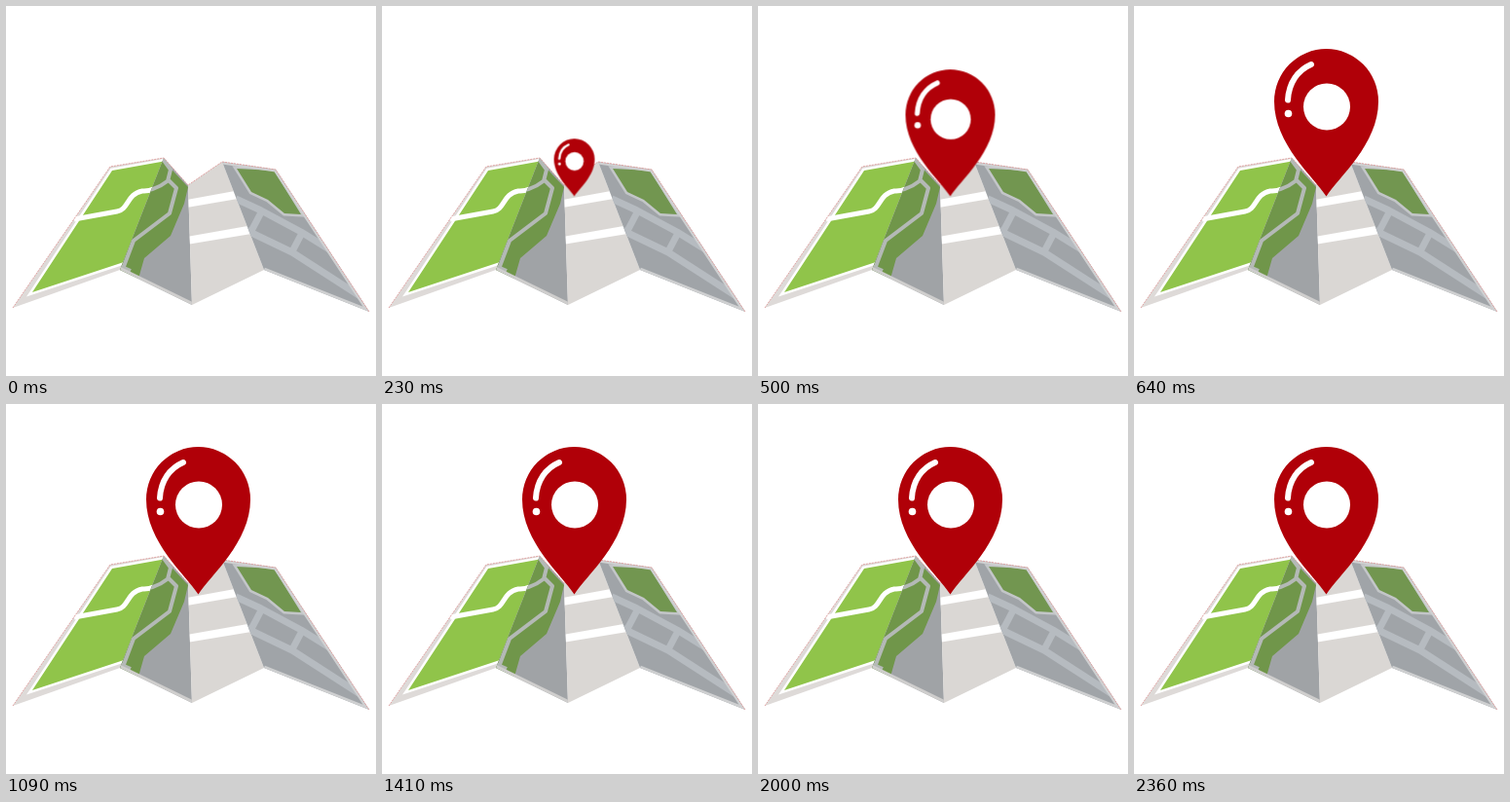
Animation of 380x380 px, one loop 2.4 s. Source, as an HTML page:

```html
<!DOCTYPE html>
<html lang="en">
<head>
<meta charset="utf-8">
<title>Map pin</title>
<style>
html, body { margin: 0; width: 100%; height: 100%; overflow: hidden; background: #fff; }
svg { display: block; width: 100vw; height: 100vh; }
.line { fill: none; stroke-linejoin: round; }
.park { paint-order: stroke; stroke-width: 5; }
.pin {
  transform-origin: 197.5px 195.5px;
  animation: grow 2400ms -1ms infinite;
}
@keyframes grow {
  0% { transform: scale(0); animation-timing-function: steps(12); }
  22.5% { transform: scale(.938); animation-timing-function: step-end; }
  24.375%, 100% { transform: scale(1); }
}
</style>
</head>
<body>
<svg viewBox="0 0 380 380">
  <defs>
    <clipPath id="p1"><path d="M7 310 107 165 162 156 117 271z"/></clipPath>
    <clipPath id="p2"><path d="M162 156 187 184 191 307 117 271z"/></clipPath>
    <clipPath id="p3"><path d="M187 184 222 160 265 271 191 307z"/></clipPath>
    <clipPath id="p4"><path d="M222 160 277 168 373 314 265 271z"/></clipPath>
  </defs>

  <g clip-path="url(#p1)">
    <path fill="#dedad8" d="M0 150h170v170H0z"/>
    <path class="park" fill="#90c44a" stroke="#fff" d="M27 294 109 169 170 158 170 247 118 264z"/>
    <path class="line" stroke="#fff" stroke-width="5" d="M70 219 114 211C126 209 124 193 140 190Q152 191 166 179"/>
  </g>

  <g clip-path="url(#p2)">
    <path fill="#a0a3a6" d="M110 150h90v160h-90z"/>
    <path fill="#70964a" d="M160 157 187 186 183 203 169 236 142 259 136 280 112 270z"/>
    <path class="line" stroke="#b4b9b6" stroke-width="4" d="M132 191Q152 191 167 179L175 187 168 213 131 241 120 270M161 157 169 168 166 180M112 265 128 272"/>
    <path class="line" stroke="#cfcecd" stroke-width="6" d="M117 271 191 307"/>
  </g>

  <g clip-path="url(#p3)">
    <path fill="#dad7d4" d="M180 150h90v160h-90z"/>
    <path fill="#fff" d="M186 199 235 190 238 198 186 207zM186 237 248 226 252 234 186 245z"/>
  </g>

  <g clip-path="url(#p4)">
    <path fill="#a0a4a8" d="M215 150h160v170H215z"/>
    <path class="line" stroke="#b6bbc0" stroke-width="7" d="M236 198 262 210 303 232 345 258M246 230 294 253 370 302M263 210 251 233M304 233 293 254"/>
    <path class="park" fill="#729650" stroke="#c3c6c8" d="M237 167 275 169 303 214 286 213 269 199 252 191z"/>
    <path class="line" stroke="#cfd0d1" stroke-width="5" d="M222 160 277 168 373 314 265 271"/>
  </g>

  <path class="line" stroke="#e0a3a3" stroke-width="1" stroke-dasharray="2 1" d="M7 310 107 165 162 156 187 184 222 160 277 168 373 314"/>

  <g class="pin">
    <path fill="#b00008" d="M197.5 195.500C185 176 144 142 144 98A53.5 54 0 0 1 251 98C251 142 210 176 197.5 195.500z"/>
    <circle fill="#fff" cx="198" cy="103.500" r="24"/>
    <path class="line" stroke="#fff" stroke-width="6" stroke-linecap="round" d="M158 96.500C159 79 168 66 182 60"/>
    <circle fill="#fff" cx="158.500" cy="110.500" r="3.800"/>
  </g>
</svg>
</body>
</html>
```
